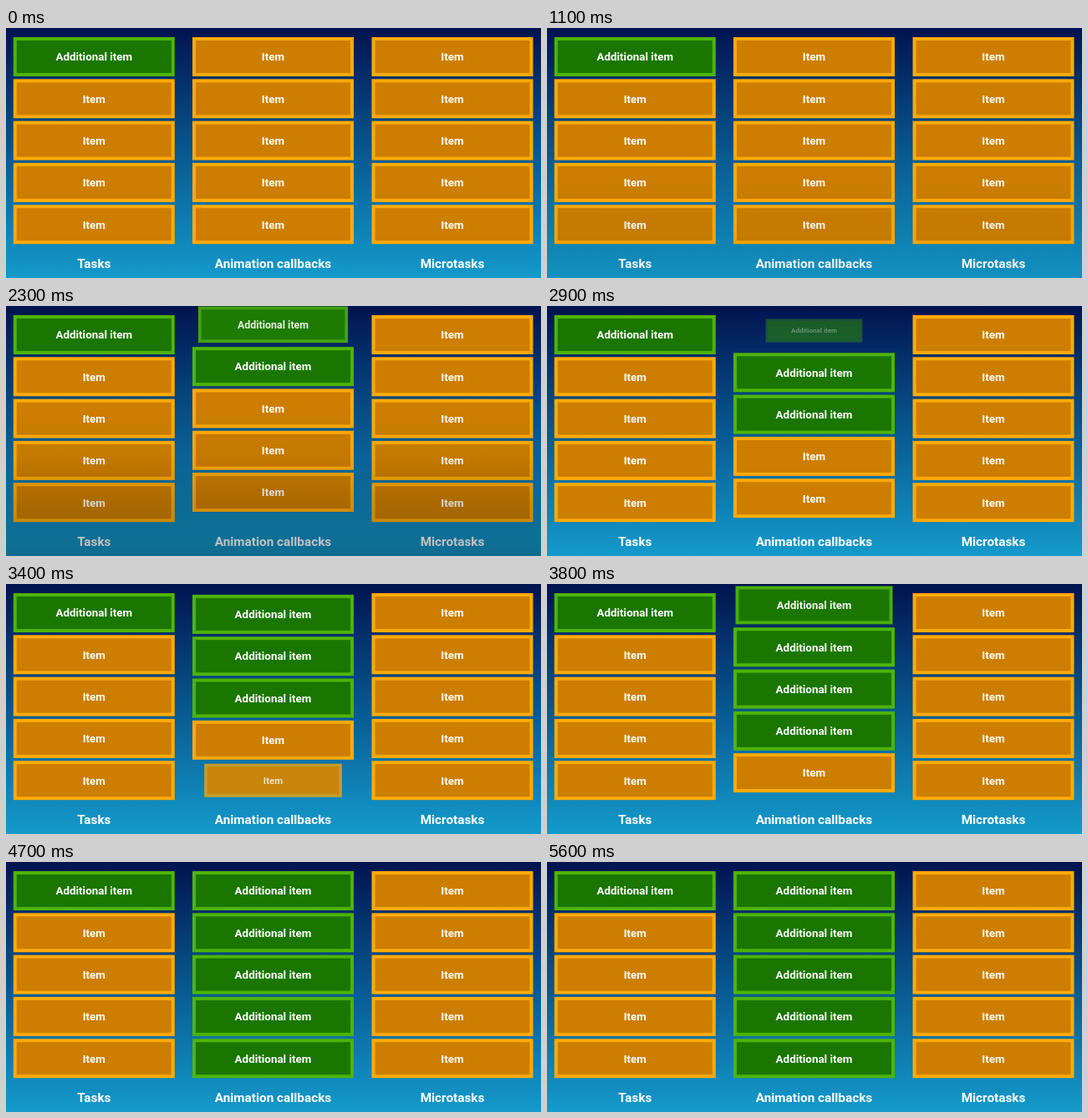
Animation of 640x300 px, one loop 6.1 s. Source, as an HTML page with a canvas:

```html
<!DOCTYPE html>
<html lang="en">
<head>
<meta charset="utf-8">
<title>Task queues</title>
<style>
  html, body { margin: 0; width: 100%; height: 100%; overflow: hidden; background: #001450; }
  canvas { display: block; }
</style>
</head>
<body>
<canvas id="stage" width="640" height="300"></canvas>
<script>
const ctx = document.getElementById('stage').getContext('2d');
const LOOP = 6100, STEP = 100;
const SLOTS = 5, BOX_W = 193, BOX_H = 47, PITCH = 50.3, FIRST_Y = 34.5;
const COLUMNS = [
  { x: 105.3, label: 'Tasks' },
  { x: 319.5, label: 'Animation callbacks' },
  { x: 534, label: 'Microtasks' },
];
const ITEM = { text: 'Item', fill: '#cc7e00', edge: '#fdaa08' };
const ADDED = { text: 'Additional item', fill: '#1a7600', edge: '#4eb405' };

// Each start removes the last callback and queues a new one on top.
const STARTS = [1228, 1896, 2617, 3351, 4000];
const DROP_MS = 700, ENTER_DELAY = 243, ENTER_MS = 318, LEAVE_MS = 200;

const clamp = v => Math.min(1, Math.max(0, v));
const easeOut = v => 1 - (1 - clamp(v)) ** 3;
const slotY = i => FIRST_Y + i * PITCH;

function bounce(v) {
  v = clamp(v) * 2.75;
  const k = 7.5625 / 2.75 ** 2;
  if (v < 1) return k * v * v;
  if (v < 2) return k * (v - 1.5) ** 2 + 0.75;
  if (v < 2.5) return k * (v - 2.25) ** 2 + 0.9375;
  return k * (v - 2.625) ** 2 + 0.984375;
}

function gradient(stops) {
  const g = ctx.createLinearGradient(0, 0, 0, 300);
  for (const [at, color] of stops) g.addColorStop(at, color);
  return g;
}

const backdrop = gradient([[0, '#01134f'], [0.5, '#08588f'], [1, '#149acb']]);
const shade = gradient([
  [0.4, 'rgba(0,0,0,0)'], [0.6, 'rgba(0,0,0,.04)'],
  [0.78, 'rgba(0,0,0,.16)'], [0.94, 'rgba(0,0,0,.24)'], [1, 'rgba(0,0,0,.3)'],
]);

function drawBox(kind, x, y, presence = 1) {
  if (presence <= 0) return;
  const scale = 0.4 + 0.6 * presence;
  ctx.save();
  ctx.globalAlpha = presence;
  ctx.translate(x, y);
  ctx.scale(scale, scale);
  ctx.fillStyle = kind.edge;
  ctx.fillRect(-BOX_W / 2, -BOX_H / 2, BOX_W, BOX_H);
  ctx.fillStyle = kind.fill;
  ctx.fillRect(-BOX_W / 2 + 4, -BOX_H / 2 + 4, BOX_W - 8, BOX_H - 8);
  ctx.fillStyle = '#fff';
  ctx.font = '700 13.4px Roboto, sans-serif';
  ctx.fillText(kind.text, 0, 4.8);
  ctx.restore();
}

function drawCallbacks(x, t) {
  const count = STARTS.filter(s => t >= s).length;
  const age = count ? t - STARTS[count - 1] : Infinity;
  const lift = (1 - bounce(age / DROP_MS)) * PITCH;
  if (count) drawBox(ITEM, x, slotY(SLOTS - 1), 1 - clamp(age / LEAVE_MS));
  for (let i = SLOTS - 1; i >= 0; i--) {
    const entering = count && i === 0;
    const presence = entering ? easeOut((age - ENTER_DELAY) / ENTER_MS) : 1;
    drawBox(i < count ? ADDED : ITEM, x, slotY(i) - lift, presence);
  }
}

function draw(t) {
  ctx.fillStyle = backdrop;
  ctx.fillRect(0, 0, 640, 300);
  ctx.textAlign = 'center';

  COLUMNS.forEach(({ x, label }, column) => {
    if (column === 1) drawCallbacks(x, t);
    else for (let i = 0; i < SLOTS; i++) {
      drawBox(column === 0 && i === 0 ? ADDED : ITEM, x, slotY(i));
    }
    ctx.fillStyle = '#fff';
    ctx.font = '700 15.3px Roboto, sans-serif';
    ctx.fillText(label, x, 288);
  });

  ctx.globalAlpha = clamp((t - 1050) / 250) * (1 - clamp((t - 2350) / 250));
  ctx.fillStyle = shade;
  ctx.fillRect(0, 0, 640, 300);
  ctx.globalAlpha = 1;
}

const begin = performance.now();
function tick() {
  const t = (performance.now() - begin) % LOOP;
  draw(Math.floor(t / STEP) * STEP);
  requestAnimationFrame(tick);
}
tick();
</script>
</body>
</html>
```
